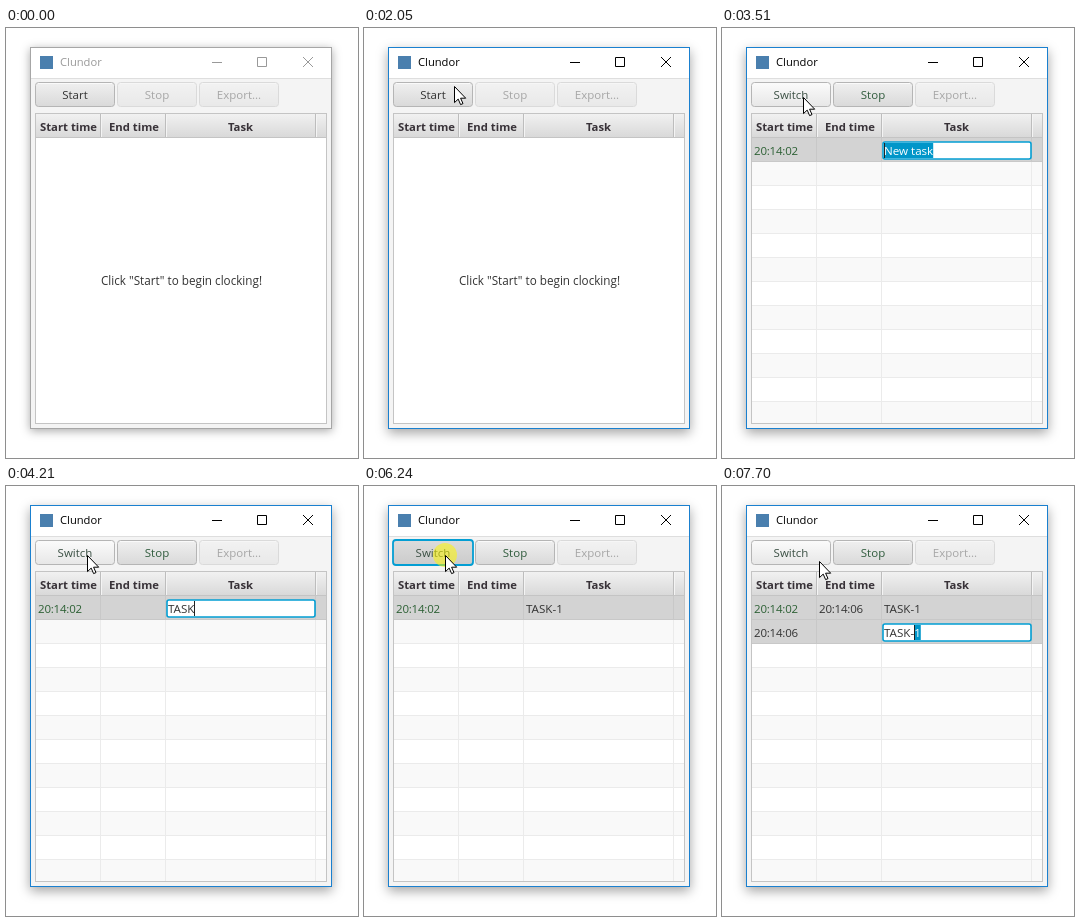
These frames come from a looping animation (352 by 430 pixels, 8000 ms). An HTML page:

```html
<!DOCTYPE html>
<html lang="en">
<head>
<meta charset="utf-8">
<title>Time tracker</title>
<style>
html, body { margin: 0; width: 100%; height: 100%; overflow: hidden; background: #fff; }
#win { position: absolute; left: 24px; top: 19px; width: 302px; height: 382px; box-shadow: 0 2px 9px rgba(0,0,0,.34); }
#win.active { box-shadow: 0 4px 11px rgba(0,0,0,.36); }
svg { position: absolute; left: 0; top: 0; display: block; }
text { font: 11.5px "Open Sans", "Noto Sans", sans-serif; fill: #333; white-space: pre; }
</style>
</head>
<body>
<div id="win"></div>
<svg width="352" height="430" viewBox="0 0 352 430">
  <defs>
    <linearGradient id="normal" x2="0" y2="1"><stop stop-color="#f0f0f0"/><stop offset="1" stop-color="#d9d9d9"/></linearGradient>
    <linearGradient id="hover" x2="0" y2="1"><stop stop-color="#fbfbfb"/><stop offset="1" stop-color="#e7e7e7"/></linearGradient>
    <linearGradient id="press" x2="0" y2="1"><stop stop-color="#dcdcdc"/><stop offset="1" stop-color="#cbcbcb"/></linearGradient>
    <linearGradient id="head" x2="0" y2="1"><stop stop-color="#f1f1f1"/><stop offset="1" stop-color="#d9d9d9"/></linearGradient>
  </defs>
  <g id="scene"></g>
  <g id="pointer" visibility="hidden">
    <circle id="halo" r="12" fill="#fdf500" opacity=".55"/>
    <path d="M.5 .5V16.6L4.2 13.1L6.6 18.6L9 17.6L6.6 12.2H11.7Z" fill="#fff" stroke="#000"/>
  </g>
</svg>
<script>
const LOOP = 8000;
const TEAL = '#039ed3', GREEN = '#2c6034', DARK = '#333';
const COLS = [94, 159, 309];
const ROW_TOP = 110, ROW_H = 24;
const EDIT_SIZE = 11.6;

// Each step overrides part of the state from its time on.
const STEPS = [
  [0, { active: 0, click: 0, label: 'Start', hover: 0, press: 0, focus: 0, rows: 0, picked: 0, edit: -1, text: '', sel: 0, selEnd: 0, caret: 0, caretAt: 0 }],
  [1360, { active: 1, click: 1 }],
  [1440, { click: 0 }],
  [2055, { hover: 1 }],
  [2440, { click: 1, press: 1, focus: 1 }],
  [2510, { click: 0, press: 0, label: 'Switch', rows: 1 }],
  [2590, { focus: 0, picked: 1, edit: 0, text: 'New task', selEnd: 8, caret: 1 }],
  [3050, { caret: 0 }],
  [3510, { caret: 1 }],
  [3740, typed('T')],
  [4060, typed('TA')],
  [4140, typed('TAS')],
  [4210, typed('TASK')],
  [4530, typed('TASK-')],
  [4840, typed('TASK-1')],
  [4990, { edit: -1, focus: 1 }],
  [6240, { click: 1, press: 1 }],
  [6310, { click: 0, press: 0, rows: 2 }],
  [6380, { focus: 0, picked: 2, edit: 1, sel: 0, selEnd: 6, caret: 1, caretAt: 0 }],
  [6860, { caret: 0 }],
  [7390, { caret: 1 }],
  [7470, { sel: 6, selEnd: 6, caretAt: 6 }],
  [7700, { sel: 5, caretAt: 5 }]
];

// Pointer moves: first time, last time, number of positions, from, to.
const MOVES = [
  [820, 1210, 6, [139, 2], [120, 30]],
  [1740, 2210, 7, [118, 32], [80, 67]],
  [2590, 2900, 5, [80, 67], [82, 70]],
  [3130, 3130, 1, [81, 69], [81, 69]],
  [6780, 6860, 2, [90, 72], [97, 75]]
];

const $ = id => document.getElementById(id);
const ctx = document.createElement('canvas').getContext('2d');

function typed(text) {
  return { text, sel: 0, selEnd: 0, caret: 1, caretAt: text.length };
}

function stateAt(t) {
  return Object.assign({}, ...STEPS.filter(s => s[0] <= t).map(s => s[1]));
}

function pointerAt(t) {
  const move = MOVES.filter(m => m[0] <= t).pop();
  if (!move) return null;
  const [start, end, count, from, to] = move;
  if (count < 2 || t >= end) return to;
  const gap = (end - start) / (count - 1);
  const p = Math.floor((t - start) / gap + 0.06) / (count - 1);
  const e = p * p * (3 - 2 * p);
  return from.map((v, i) => Math.round(v + (to[i] - v) * e));
}

const rect = (x, y, w, h, fill, more = '') =>
  `<rect x="${x}" y="${y}" width="${w}" height="${h}" fill="${fill}" ${more}/>`;
const line = (d, color) => `<path d="${d}" fill="none" stroke="${color}"/>`;
const label = (x, y, str, style = '', anchor = 'start') =>
  `<text x="${x}" y="${y}" text-anchor="${anchor}" style="${style}">${str}</text>`;
const clock = (x, y, str, color) => label(x, y, str, `letter-spacing:-.2px;fill:${color}`);

function widthOf(str) {
  ctx.font = `${EDIT_SIZE}px "Open Sans", "Noto Sans", sans-serif`;
  return ctx.measureText(str).width;
}

function button(x, str, { enabled = 1, fill = 'normal', focus = 0, color = DARK } = {}) {
  const edge = focus
    ? rect(x, 54, 80, 25, `url(#${fill})`, `rx="3" stroke="${TEAL}" stroke-width="1.8"`)
    : rect(x + .5, 54.5, 79, 24, `url(#${fill})`, 'rx="3" stroke="#b5b5b5"') +
      line(`M${x + 3} 55.5h74`, '#fafafa');
  return `<g opacity="${enabled ? 1 : .4}">${edge}${label(x + 40, 71, str, `fill:${color}`, 'middle')}</g>`;
}

function frame(s) {
  const ink = s.active ? '#000' : '#999';
  return rect(24.5, 19.5, 301, 381, '#f4f4f4', `stroke="${s.active ? '#1a80cf' : '#a6a6a6'}"`) +
    rect(25, 20, 300, 30, '#fff') +
    line('M25 50.5H325', '#dedede') +
    rect(34, 28, 13, 13, '#4a7fae') +
    label(54, 38, 'Clundor', `font-size:11.2px;fill:${ink}`) +
    line('M206 34.5h10M251.5 29.5h9v9h-9zM297 29l10 10M307 29l-10 10', ink);
}

function toolbar(s) {
  const running = s.rows > 0;
  return button(29, s.label, {
    fill: s.press ? 'press' : s.hover ? 'hover' : 'normal',
    focus: s.focus,
    color: s.hover ? '#3a4f43' : DARK
  }) +
  button(111, 'Stop', { enabled: running, color: running ? '#2f5b3c' : DARK }) +
  button(193, 'Export...', { enabled: 0 });
}

function header() {
  const title = (x, str) =>
    label(x, 103, str, 'font-weight:700;font-size:11.3px;fill:#383238', 'middle');
  return rect(30, 86, 290, 23, 'url(#head)') +
    line('M30 109.5H320', '#c4c4c4') +
    COLS.map(x => line(`M${x + .5} 86V109`, '#bdbdbd') + line(`M${x + 1.5} 86V109`, '#f4f4f4')).join('') +
    title(62.5, 'Start time') + title(128, 'End time') + title(234.5, 'Task');
}

function grid(s) {
  let out = '';
  for (let i = 0; i < 12; i++) {
    const y = ROW_TOP + i * ROW_H, h = Math.min(ROW_H, 395 - y);
    const picked = i < s.picked;
    out += rect(30, y, 290, h, picked ? '#d3d3d3' : i % 2 ? '#f9f9f9' : '#fff');
    const edge = picked ? '#c8c8c8' : '#ebebeb';
    out += line(COLS.map(x => `M${x + .5} ${y}v${h}`).join(''), edge);
    if (h === ROW_H) out += line(`M30 ${y + 23.5}H320`, edge);
  }
  return out;
}

function editor(s) {
  const y = ROW_TOP + s.edit * ROW_H, x = 162, base = y + 17;
  const at = n => x + widthOf(s.text.slice(0, n));
  const part = (a, b, color) => a < b
    ? label(at(a), base, s.text.slice(a, b), `font-size:${EDIT_SIZE}px;fill:${color}`) : '';
  const a = at(s.sel), b = at(s.selEnd);
  return rect(161, y + 4, 148, 17, '#fff', `rx="2" stroke="${TEAL}" stroke-width="1.6"`) +
    (b > a ? rect(a, y + 5, b - a, 15, '#0096c9') : '') +
    part(0, s.sel, DARK) + part(s.sel, s.selEnd, '#fff') + part(s.selEnd, s.text.length, DARK) +
    (s.caret ? rect(Math.round(at(s.caretAt)), y + 5, 1, 15, '#222') : '');
}

function cells(s) {
  const task = (y, str, color) => label(162, y, str, `font-size:${EDIT_SIZE}px;fill:${color}`);
  let out = '';
  if (s.rows > 0) {
    out += clock(32, 127, '20:14:02', GREEN);
    if (s.edit !== 0) out += s.text ? task(127, 'TASK-1', DARK) : task(127, 'New task', '#2d5f3f');
  }
  if (s.rows > 1) {
    out += clock(97, 127, '20:14:06', DARK) + clock(32, 151, '20:14:06', DARK);
    if (s.edit !== 1) out += task(151, 'TASK-1', DARK);
  }
  return out + (s.edit >= 0 ? editor(s) : '');
}

function table(s) {
  const body = s.rows
    ? grid(s) + cells(s)
    : label(175.5, 257, 'Click "Start" to begin clocking!', 'font-size:11.7px', 'middle');
  return rect(29.5, 85.5, 291, 310, '#fff', 'stroke="#c4c4c4"') + header() + body;
}

let lastKey = '';

function draw() {
  const t = performance.now() % LOOP;
  const s = stateAt(t), key = JSON.stringify(s), pos = pointerAt(t);
  if (key !== lastKey) {
    lastKey = key;
    $('win').className = s.active ? 'active' : '';
    $('scene').innerHTML = frame(s) + toolbar(s) + table(s);
    $('halo').setAttribute('visibility', s.click ? 'inherit' : 'hidden');
  }
  $('pointer').setAttribute('visibility', pos ? 'visible' : 'hidden');
  if (pos) $('pointer').setAttribute('transform', `translate(${pos})`);
  requestAnimationFrame(draw);
}
draw();
</script>
</body>
</html>
```
